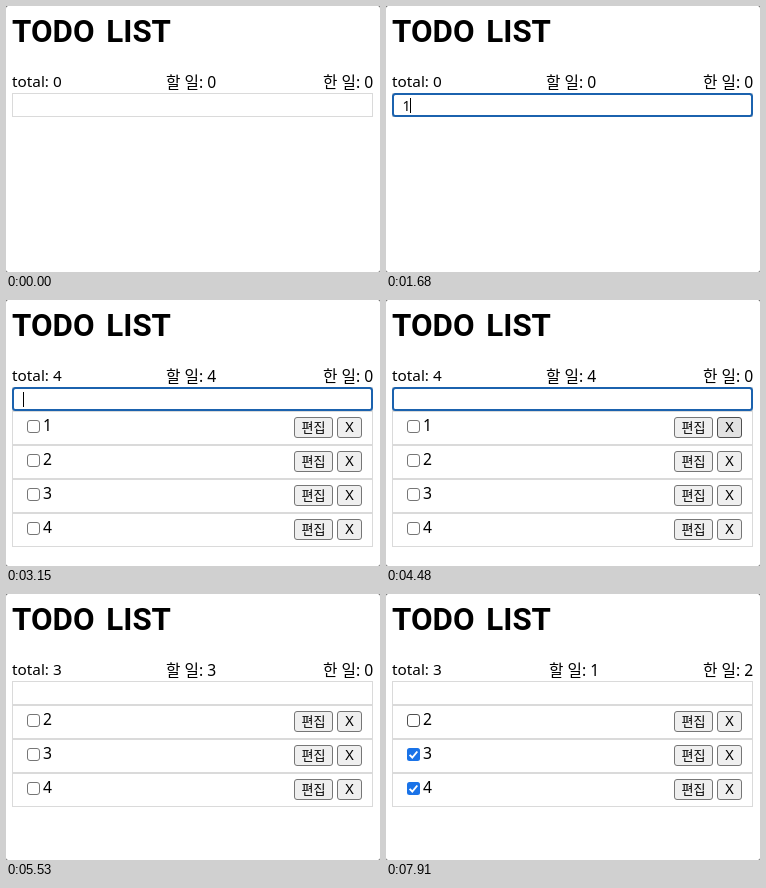
Animation, 374 px wide and 266 px high, one loop 8 s. Source, as an HTML page:

```html
<!DOCTYPE html>
<html lang="ko">
<head>
<meta charset="utf-8">
<style>
  html, body { margin: 0; height: 100%; overflow: hidden; background: #fff; }
  svg { display: block; width: 374px; height: 266px; background: #666; }
  text { font: 500 15.3px "Noto Sans", "Noto Sans CJK KR", sans-serif; white-space: pre; }
  .title { font: bold 31.3px Roboto, sans-serif; word-spacing: 4px; }
  .count { font-size: 15.7px; }
  .typed { font-size: 14px; }
  .label { font-size: 13px; text-anchor: middle; }
  .cross { font-size: 14.5px; text-anchor: middle; }
</style>
</head>
<body>
<svg id="stage" viewBox="0 0 374 266"></svg>
<script>
const LOOP = 8000;
const stage = document.getElementById('stage');

const start = { focus: false, caret: false, typed: '', items: [], done: [], hover: '', press: '' };

// Each step changes part of the state; hover and press name a control and its row.
const steps = [
  [770, { focus: true, caret: true }],
  [1330, { caret: false }],
  [1680, { typed: '1', caret: true }],
  [1960, { typed: '', items: [1] }],
  [2100, { typed: '2' }],
  [2380, { typed: '', items: [1, 2] }],
  [2590, { typed: '3' }],
  [2870, { typed: '4', items: [1, 2, 3] }],
  [3150, { typed: '', items: [1, 2, 3, 4] }],
  [3430, { caret: false }],
  [3920, { caret: true }],
  [4200, { hover: 'x1' }],
  [4340, { hover: 'x0' }],
  [4480, { caret: false }],
  [4690, { focus: false, press: 'x0' }],
  [4830, { press: '', items: [2, 3, 4] }],
  [5250, { hover: '' }],
  [5390, { hover: 'x1' }],
  [5530, { hover: '' }],
  [6090, { hover: 'c1' }],
  [6230, { press: 'c1' }],
  [6300, { press: '', done: [3] }],
  [6650, { hover: '' }],
  [6930, { hover: 'c2' }],
  [7000, { press: 'c2' }],
  [7070, { press: '', done: [3, 4] }],
  [7210, { hover: 'c1' }],
  [7350, { hover: 'c0' }],
  [7490, { press: 'c0' }],
  [7560, { press: '', done: [2, 3, 4] }],
  [7840, { press: 'c0' }],
  [7910, { press: '', done: [3, 4] }]
];

const text = (x, y, body, attrs = '') => `<text x="${x}" y="${y}" ${attrs}>${body}</text>`;
const rect = (x, y, w, h, fill, stroke = 'none', attrs = '') =>
  `<rect x="${x}" y="${y}" width="${w}" height="${h}" fill="${fill}" stroke="${stroke}" ${attrs}/>`;
const frame = (y, h) => rect(6.5, y + .5, 360, h - 1, '#fff', '#dadada');

// Picks the normal, hovered or pressed variant.
const pick = (s, id, colors) => colors[s.press === id ? 2 : s.hover === id ? 1 : 0];

const EDGE = ['#767676', '#4f4f4f', '#8d8d8d'];
const FACE = ['#efefef', '#e2e2e2', '#f5f5f5'];
const TICKED = ['#1a73e8', '#185abc', '#4a90f0'];

function button(s, id, x, y, w, label, cls) {
  return rect(x + .5, y + .5, w - 1, 20, pick(s, id, FACE), pick(s, id, EDGE), 'rx="2.5"') +
    text(x + w / 2, y + 15, label, `class="${cls}"`);
}

function checkbox(s, id, y, ticked) {
  if (!ticked) return rect(21.5, y + .5, 12, 12, '#fff', pick(s, id, EDGE), 'rx="2.5"');
  return rect(21, y, 13, 13, pick(s, id, TICKED), 'none', 'rx="2.5"') +
    `<path d="M23.6 ${y + 6.8}l2.7 2.7 5-6" fill="none" stroke="#fff" stroke-width="1.9"/>`;
}

function row(s, item, i) {
  const y = 111 + 34 * i;
  return frame(y, 34) + checkbox(s, 'c' + i, y + 9, s.done.includes(item)) +
    text(37, y + 20, item, 'class="count"') +
    button(s, 'e' + i, 288, y + 6, 39, '편집', 'label') +
    button(s, 'x' + i, 331, y + 6, 25, 'X', 'cross');
}

function input(s) {
  let out = frame(87, 24);
  if (s.focus) out += rect(7, 88, 359, 22, '#fff', '#1b62ae', 'stroke-width="2" rx="2.5"');
  out += text(16.5, 104.5, s.typed, 'class="typed"');
  return out + (s.caret ? rect(s.typed ? 24 : 17, 92, 1, 15, '#000') : '');
}

function counts(s) {
  const total = s.items.length, done = s.done.length, todo = total - done;
  const middle = todo === 1 || done === 1 ? 163 : 160;
  const right = done === 1 ? 370.3 : 367.3;
  return text(6, 81, 'total: ' + total) +
    text(middle, 81.5, '할 일: ' + todo, 'class="count"') +
    text(right, 81.5, '한 일: ' + done, 'class="count" text-anchor="end"');
}

function render(s) {
  return rect(0, 0, 374, 266, '#fff', 'none', 'rx="2.5"') +
    text(6, 36, 'TODO LIST', 'class="title"') +
    counts(s) + s.items.map((item, i) => row(s, item, i)).join('') + input(s);
}

let shown = -1;
function tick() {
  const t = performance.now() % LOOP;
  const past = steps.filter(([at]) => at <= t);
  if (past.length !== shown) {
    shown = past.length;
    stage.innerHTML = render(Object.assign({}, start, ...past.map(step => step[1])));
  }
  requestAnimationFrame(tick);
}
tick();
</script>
</body>
</html>
```
